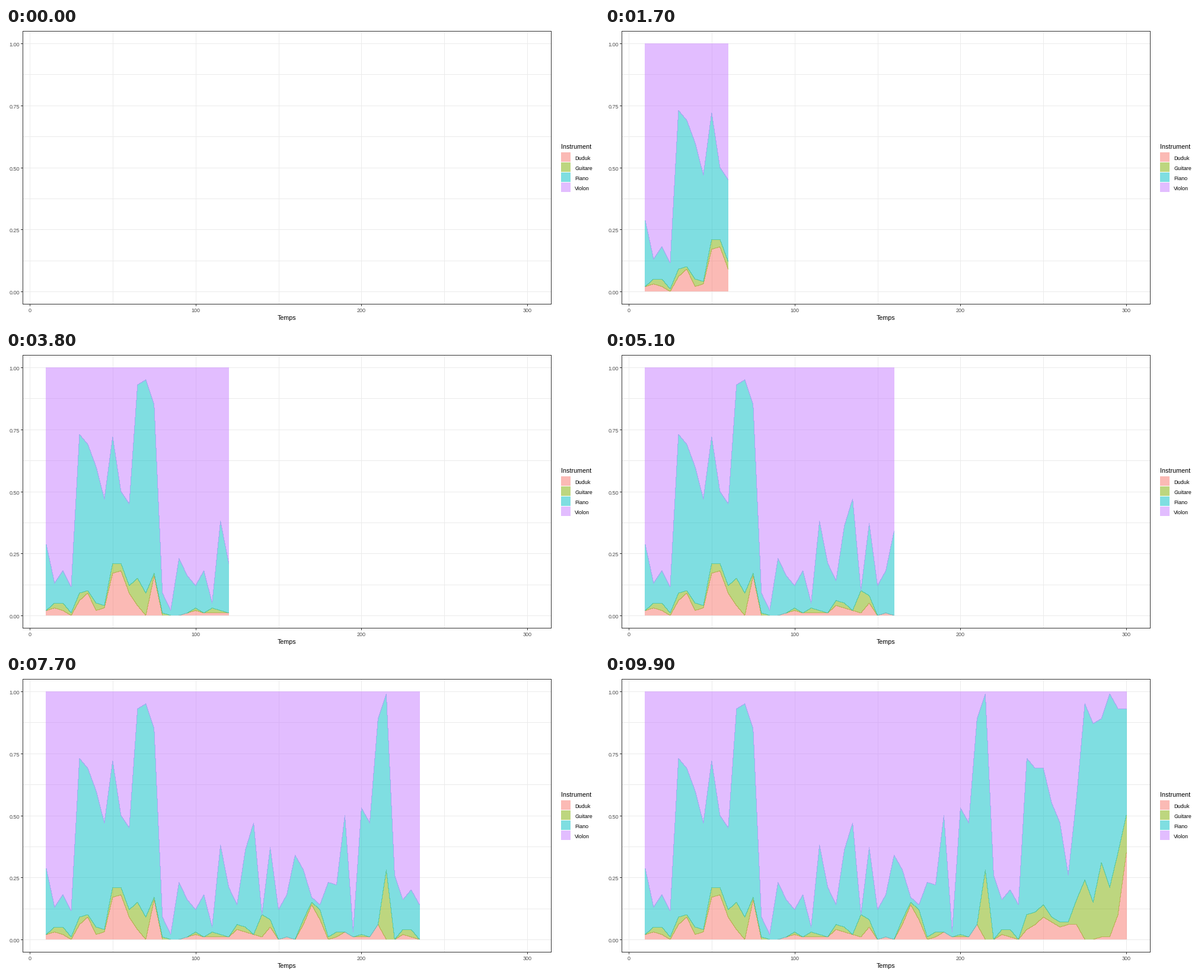
A matplotlib script for the animation above (10000 ms loop, 1000x500 px).

```python
import numpy as np
import matplotlib.pyplot as plt
from matplotlib.animation import FuncAnimation
from matplotlib.patches import Polygon, Rectangle

W, H, DPI = 1000, 500, 100
FRAMES, INTERVAL = 100, 100
X0, X_UNIT = 40.0, 2.797      # pixel of x = 0, pixels per time unit
Y0, Y_UNIT = 445.0, 419.0     # pixel of y = 0, pixels per whole share
LEFT, TOP, RIGHT, BOTTOM = 28, 5, 919, 466

NAMES = ["Duduk", "Guitare", "Piano", "Violon"]
COLORS = ["#F8766D", "#7CAE00", "#00BFC4", "#C77CFF"]
GRID, DARK, LABEL = "#EBEBEB", "#333333", "#4D4D4D"

plt.rcParams["font.family"] = "Liberation Sans"

# Upper edge of each stacked band in percent, every 5 time units from 10 to 300
duduk = [2, 3, 2, 0, 6, 9, 2, 3, 17, 18, 9, 4, 0, 16, 0, 0, 0, 1, 2, 1,
         1, 1, 1, 4, 3, 2, 1, 5, 0, 1, 0, 6, 14, 8, 0, 1, 3, 1, 1, 1,
         6, 0, 0, 2, 1, 0, 4, 6, 9, 7, 5, 6, 6, 0, 0, 1, 1, 10, 35]
guitare = [2, 5, 5, 1, 9, 10, 5, 4, 21, 21, 12, 15, 9, 17, 1, 0, 0, 1, 3, 1,
           3, 2, 1, 6, 5, 2, 10, 8, 0, 1, 0, 8, 15, 12, 1, 3, 3, 1, 2, 1,
           6, 28, 0, 4, 4, 0, 10, 11, 14, 9, 7, 7, 16, 24, 15, 31, 21, 35, 50]
piano = [28.5, 13, 18, 11.5, 73, 69, 60, 47, 72, 50, 45, 93, 95, 85, 9, 2, 23,
         16, 12, 18, 5, 38, 21, 14, 36, 47, 10, 37, 12, 18, 34, 28, 17, 14, 23,
         22, 50, 3, 53, 47, 89, 99, 26, 16, 20, 14, 73, 69, 69, 55, 47, 26,
         57, 95, 87, 89, 99, 93, 93]

N = len(piano)
steps = np.arange(N)
edges = [np.array(e) / 100 for e in (np.zeros(N), duduk, guitare, piano, np.full(N, 100))]
# Each data point is reached on a whole frame
arrival = np.round((FRAMES - 1) * steps / (N - 1))


def px(x):
    return X0 + X_UNIT * x


def py(y):
    return Y0 - Y_UNIT * y


fig = plt.figure(figsize=(W / DPI, H / DPI), dpi=DPI, facecolor="white")
ax = fig.add_axes([0, 0, 1, 1])
ax.set_xlim(0, W)
ax.set_ylim(H, 0)
ax.axis("off")


def box(x, y, w, h, color, z, alpha=1):
    ax.add_patch(Rectangle((x, y), w, h, facecolor=color, alpha=alpha,
                           linewidth=0, zorder=z))


def text(x, y, s, size, color="black", ha="left"):
    ax.text(x, y, s, fontsize=size * 72 / DPI, color=color, ha=ha, va="baseline")


def draw_panel():
    for k in range(9):
        y = round(py(k / 8))
        box(LEFT, y, RIGHT - LEFT, 1, GRID, 1)
        if k % 2 == 0:
            box(LEFT - 3, y, 3, 1, DARK, 4)
            text(23, y + 5, f"{k / 8:.2f}", 9, LABEL, "right")
    for x in range(0, 301, 50):
        col = round(px(x))
        box(col, TOP, 1, BOTTOM - TOP, GRID, 1)
        if x % 100 == 0:
            box(col, BOTTOM + 1, 1, 3, DARK, 4)
            text(col, 480, str(x), 9, LABEL, "center")
    for y in (TOP, BOTTOM):
        box(LEFT, y, RIGHT - LEFT + 1, 1, DARK, 4)
    for x in (LEFT, RIGHT):
        box(x, TOP, 1, BOTTOM - TOP + 1, DARK, 4)
    text(474, 493, "Temps", 10.7, ha="center")


def draw_legend():
    text(936, 204, "Instrument", 10.7)
    for i, (name, color) in enumerate(zip(NAMES, COLORS)):
        box(936, 210 + 17 * i, 16, 16, color, 2, 0.5)
        text(959, 223 + 17 * i, name, 9)


draw_panel()
draw_legend()

areas = [ax.add_patch(Polygon([(0, 0)] * 3, facecolor=c, alpha=0.5, linewidth=0,
                              antialiased=False, zorder=2)) for c in COLORS]


def update(frame):
    head = np.interp(frame, arrival, steps)
    at = np.append(steps[steps < head], head)
    xs = px(10 + 5 * at)
    rows = [py(np.interp(at, steps, e)) for e in edges]
    for area, low, high in zip(areas, rows, rows[1:]):
        area.set_visible(head > 0)
        area.set_xy(np.column_stack([np.append(xs, xs[::-1]),
                                     np.append(high, low[::-1])]))
    return areas


anim = FuncAnimation(fig, update, frames=FRAMES, interval=INTERVAL,
                     init_func=lambda: update(0), repeat=True, repeat_delay=0)
plt.show()
```
